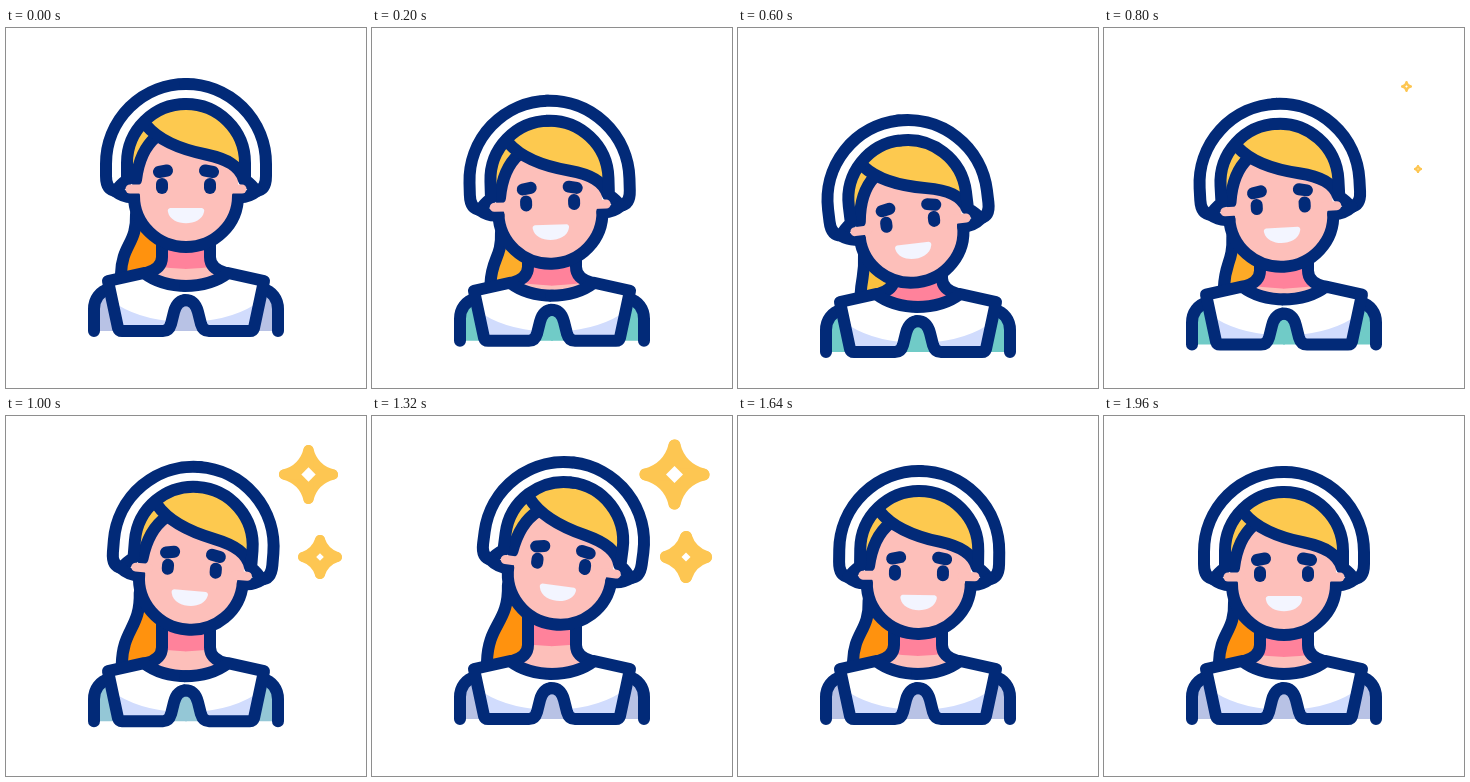
Animation of 360 by 360 pixels, one loop 2000 ms. Source, as an HTML page with a canvas:

```html
<!DOCTYPE html>
<html lang="en">
<head>
<meta charset="utf-8">
<title>Nurse</title>
<style>
html, body { margin: 0; width: 100%; height: 100%; overflow: hidden; background: #fff; }
canvas { display: block; width: 360px; height: 360px; }
</style>
</head>
<body>
<canvas id="stage" width="360" height="360"></canvas>
<script>
const ctx = document.getElementById('stage').getContext('2d');
const LOOP = 2000, STEP = 40, MID = 180;
const NAVY = '#022a78', SKIN = '#fdbfba', PINK = '#ff829b', YELLOW = '#fdc94f',
      SHADE = '#d1dcfd', STAR = '#fdc652', TEETH = '#f3f5ff';
const ORANGE = [255, 146, 14], GOLD = [251, 193, 62],
      LAVENDER = [184, 194, 229], TEAL = [112, 203, 199];

function ease(t, start, end) {
  const s = Math.min(1, Math.max(0, (t - start) / (end - start)));
  return s * s * (3 - 2 * s);
}

// Rises from 0 to 1, holds, then falls back
const pulse = (t, rise, full, fall, end) => ease(t, rise, full) - ease(t, fall, end);

const mix = (a, b, k) => `rgb(${a.map((v, i) => Math.round(v + (b[i] - v) * k)).join(',')})`;

function shape(d, fill, line, width = 12) {
  const p = new Path2D(d);
  if (fill) { ctx.fillStyle = fill; ctx.fill(p); }
  if (line) { ctx.strokeStyle = line; ctx.lineWidth = width; ctx.stroke(p); }
}

function at(x, y, angle, draw) {
  ctx.save();
  ctx.translate(x, y);
  ctx.rotate(angle);
  draw();
  ctx.restore();
}

// Draws a left half and its mirror image
function both(draw) {
  draw();
  ctx.save();
  ctx.translate(2 * MID, 0);
  ctx.scale(-1, 1);
  draw();
  ctx.restore();
}

function within(d, draw) {
  ctx.save();
  ctx.clip(new Path2D(d));
  draw();
  ctx.restore();
}

function ponytail(h, drop, color) {
  const c = Math.cos(h.a), s = Math.sin(h.a);
  const x = 115 + Math.max(0, drop) * 0.36, y = 246 + drop;
  const tx = h.x - 50 * (c + s), ty = h.y + 50 * (c - s);
  const my = (ty + y) / 2;
  const side = `M${tx} ${ty} C${tx + 1} ${my} ${x + 1} ${my} ${x} ${y}`;
  shape(`${side} H156 V${ty}Z`, color);
  shape(side, null, NAVY);
}

function body(color) {
  const shoulder = 'M88 303 V281 C88 271 94 263 103 261';
  both(() => {
    shape(shoulder + ' H181 V303Z', color);
    shape(shoulder, null, NAVY);
  });
}

function neck(chin) {
  const top = Math.min(chin - 14, 226);
  const side = `M156 ${top} V229 Q156 241 140 245`;
  const half = side + ` Q156 258 181 258 V${top}Z`;
  both(() => {
    shape(half, SKIN);
    within(half, () => shape(`M140 ${top} H181 V${chin + 22} Q160 ${chin + 21} 140 ${chin + 18}Z`, PINK));
    shape(side, null, NAVY);
  });
}

function collar() {
  const half = 'M181 258 Q155 258 138 245 L102 253 L112 300 Q113 303 116 303' +
    ' H157 Q163 303 165 296 L168 284 Q171 272 181 272';
  both(() => {
    shape(half, '#fff');
    within(half, () => shape('M106 273 Q130 291 172 294 V306 H106Z', SHADE));
    shape(half, null, NAVY);
  });
}

function hair() {
  const fringe = 'M140 97 C154 114 178 122 200 126.5 C221 131 234 138 238 152';
  const lock = 'M150 109 C138 119 132 136 130 152';
  shape(fringe + ' L239 135 A59 59 0 0 0 140 92Z', YELLOW);
  shape(lock + ' H121 V135 A59 59 0 0 1 140 97Z', YELLOW);
  shape(lock, null, NAVY);
  shape(fringe, null, NAVY);
}

function head() {
  shape('M128 166 A52 52 0 0 0 232 166 V150 L239 135 A59 59 0 0 0 121 135 L128 150Z', SKIN);
  hair();
  shape('M128 168 A52 51 0 0 0 232 168', null, NAVY);

  // Cap and ears
  both(() => {
    shape('M181 56 A80 80 0 0 0 100 136 V148 Q100 162 110 163 Q114 157 121 152 V135 A59 59 0 0 1 181 76', '#fff', NAVY);
    shape('M109 163 Q118 170 128 169', null, NAVY);
    shape('M124 161 H137', null, SKIN, 9);
  });

  // Eyes, brows, smile
  both(() => {
    shape('M156 156 V160', null, NAVY);
    shape('M153 144 L161 142.5', null, NAVY);
  });
  shape('M164 180 H196 Q199 181 198 184 C195 199 165 199 162 184 Q161 181 164 180Z', TEETH);
}

function star(x, y, tip, bend, hole, size) {
  if (size < 0.01) return;
  at(x, y, 0, () => {
    ctx.scale(size, size);
    for (let i = 0; i < 4; i++) {
      shape(`M0 0 V${-tip} Q${bend} ${-bend} ${tip} 0Z`, STAR, STAR);
      ctx.rotate(Math.PI / 2);
    }
    shape(`M0 ${-hole} L${hole} 0 L0 ${hole} L${-hole} 0Z`, '#fff');
  });
}

function draw(t) {
  // Dip down, then lift; the tilt starts later and ends later
  const dip = pulse(t, 0, 420, 600, 1100), lift = pulse(t, 600, 1100, 1320, 1720);
  const left = pulse(t, 50, 520, 620, 1150), right = pulse(t, 620, 1150, 1320, 1720);
  const h = {
    x: MID - 10.5 * left + 12 * right,
    y: 136 + 36 * dip - 10 * lift,
    a: (7.5 * right - 7 * left) * Math.PI / 180
  };
  const drop = 21 * dip;
  const teal = pulse(t, 0, 160, 800, 1200);
  const gold = pulse(t, 0, 360, 640, 960);
  const glow = pulse(t, 700, 1100, 1320, 1600);

  ctx.fillStyle = '#fff';
  ctx.fillRect(0, 0, 360, 360);
  ctx.lineCap = ctx.lineJoin = 'round';

  ponytail(h, drop, mix(ORANGE, GOLD, gold));
  at(0, drop, 0, () => {
    body(mix(LAVENDER, TEAL, teal));
    neck(h.y + 83 * Math.cos(h.a) - drop);
    collar();
  });
  at(h.x, h.y, h.a, () => {
    ctx.translate(-MID, -136);
    head();
  });
  star(302.5, 58.5, 29, 6, 8.5, glow);
  star(314, 141, 20, 5, 4.5, glow);
}

function frame() {
  const t = performance.now() % LOOP;
  draw(Math.floor(t / STEP) * STEP);
  requestAnimationFrame(frame);
}
frame();
</script>
</body>
</html>
```
